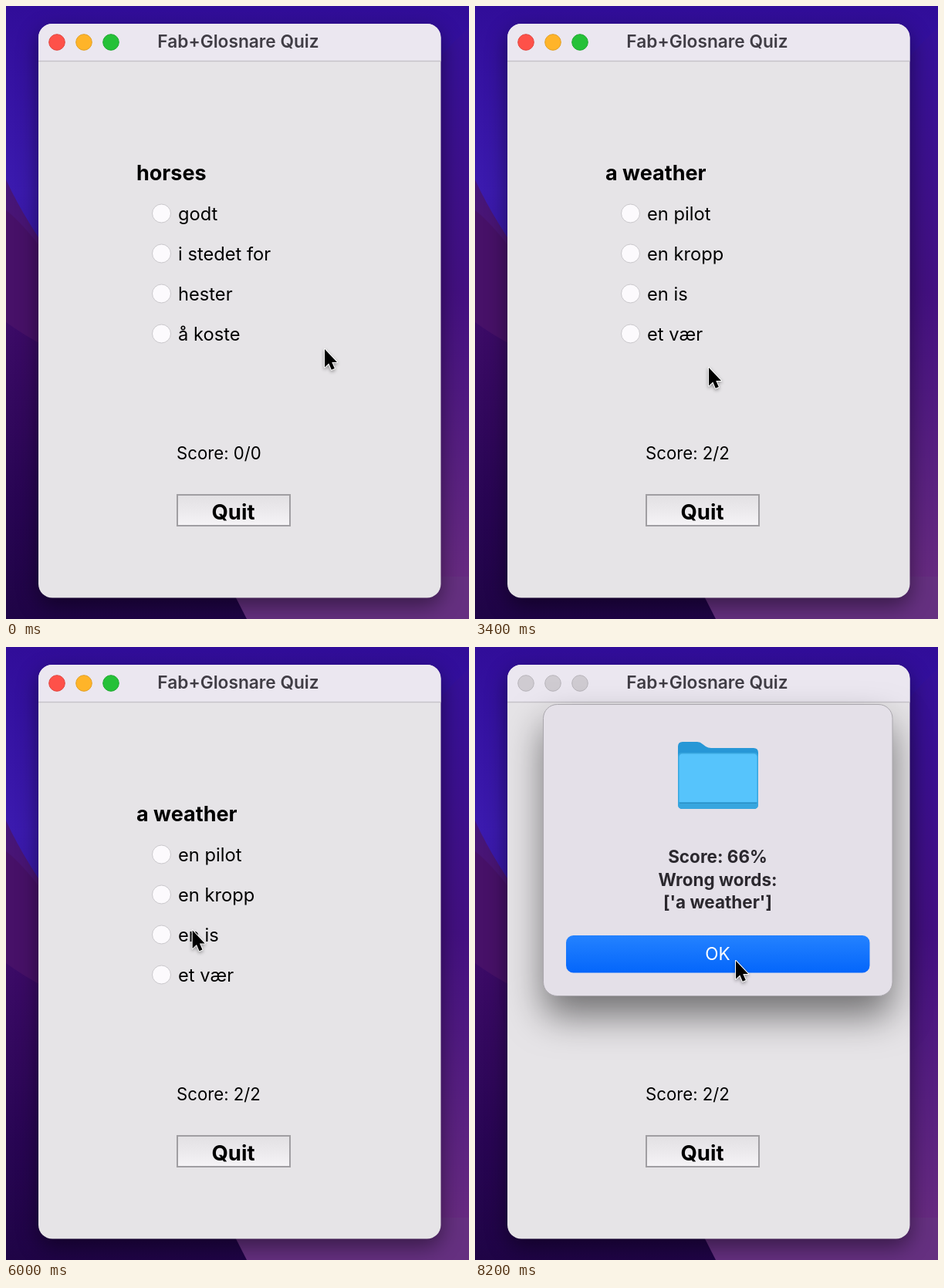
Write an HTML page that moves like this. It is 600 by 795 pixels and loops after 8.3 s.

```html
<!DOCTYPE html>
<html lang="en">
<head>
<meta charset="utf-8">
<title>Vocabulary quiz</title>
<style>
  html, body { margin: 0; width: 100%; height: 100%; overflow: hidden; background: #2c0c78; }
  svg { display: block; width: 600px; height: 795px; font-family: Inter, sans-serif; }
  .bold { font-weight: 700; }
  .middle { text-anchor: middle; }
  #window { filter: drop-shadow(0 10px 14px rgba(0, 0, 0, .45)); }
  #panel { filter: drop-shadow(0 26px 24px rgba(0, 0, 0, .5)); }
  #dialog { transform-origin: 314.5px 263.5px; }
  #cursor { filter: drop-shadow(0 2px 2px rgba(0, 0, 0, .35)); }
</style>
</head>
<body>
<svg viewBox="0 0 600 795">
  <defs>
    <linearGradient id="sky" x2="0" y2="1">
      <stop stop-color="#310d99"/>
      <stop offset=".3" stop-color="#3b1aae"/>
      <stop offset="1" stop-color="#2a0a70"/>
    </linearGradient>
    <linearGradient id="plum" x2="0" y2="1">
      <stop stop-color="#451579"/>
      <stop offset="1" stop-color="#551568"/>
    </linearGradient>
    <linearGradient id="night" x2="0" y2="1">
      <stop stop-color="#3c0b67"/>
      <stop offset=".6" stop-color="#280553"/>
      <stop offset="1" stop-color="#1f0446"/>
    </linearGradient>
    <linearGradient id="dusk" x2="0" y2="1">
      <stop stop-color="#35109a"/>
      <stop offset=".45" stop-color="#431080"/>
      <stop offset="1" stop-color="#6b2e80"/>
    </linearGradient>
    <linearGradient id="button" x2="0" y2="1">
      <stop stop-color="#e2e0e3"/>
      <stop offset="1" stop-color="#f5f3f6"/>
    </linearGradient>
    <linearGradient id="blue" x2="0" y2="1">
      <stop stop-color="#2482ff"/>
      <stop offset="1" stop-color="#0466fb"/>
    </linearGradient>
  </defs>

  <path fill="url(#sky)" d="M0 0H600V795H0Z"/>
  <path fill="url(#dusk)" d="M600 28Q575 50 550 82V795H600Z"/>
  <path fill="url(#plum)" d="M0 225Q18 265 50 312V450H0Z"/>
  <path fill="#471168" d="M0 265Q20 280 50 320V450H0Z"/>
  <path fill="url(#night)" d="M0 410Q22 426 50 441V740H320V795H0Z"/>
  <path fill="#653080" d="M284 740H600V795H312Z"/>

  <g id="window">
    <rect x="42" y="23" width="521.5" height="744.5" rx="18" fill="#e6e4e7"/>
    <path fill="#ebe7f0" d="M42 71V41a18 18 0 0 1 18-18H545.500a18 18 0 0 1 18 18V71Z"/>
  </g>
  <path stroke="#c6c3c9" stroke-width="1.5" d="M42 71.500H563.500"/>
  <g id="lights" stroke-width="1"></g>
  <text class="middle" x="301" y="54" font-size="22.700" font-weight="600" fill="#403d45">Fab+Glosnare Quiz</text>

  <text id="question" class="bold" x="169" y="226" font-size="27"></text>
  <g id="answers" font-size="23.700"></g>
  <text id="score" x="221" y="588" font-size="22.200"></text>
  <rect x="222" y="634" width="146" height="40" fill="url(#button)" stroke="#a09ea2" stroke-width="2"/>
  <text class="bold middle" x="294.500" y="666" font-size="27.500">Quit</text>

  <g id="dialog">
    <rect id="panel" x="88.500" y="74.500" width="452.500" height="378" rx="18" fill="#e4e0e8"/>
    <rect x="88.500" y="74.500" width="452.500" height="378" rx="18" fill="none" stroke="#aaa7ad"/>
    <path fill="#2797d6" d="M263 129q0-6 6-6H288q4 0 7 3l4 3q3 2 7 2H361q6 0 6 6V204q0 6-6 6H269q-6 0-6-6Z"/>
    <path fill="#37a6df" d="M263 142q0-5 5-5H362q5 0 5 5V204q0 6-6 6H269q-6 0-6-6Z"/>
    <path fill="#56c4fc" d="M264.500 143q0-4.500 4.500-4.500H361q4.500 0 4.500 4.500V201H264.500Z"/>
    <path stroke="#2c8fc4" d="M265 202.500H365"/>
    <g class="bold middle" font-size="22.500" fill="#2b282e">
      <text x="314.500" y="280">Score: 66%</text>
      <text x="314.500" y="310">Wrong words:</text>
      <text x="314.500" y="339">['a weather']</text>
    </g>
    <rect x="118" y="374" width="393.500" height="48.500" rx="9.500" fill="url(#blue)"/>
    <text class="middle" x="314.500" y="406" font-size="22.500" fill="#fff">OK</text>
  </g>

  <path id="cursor" stroke="#fff" stroke-width="2" stroke-linejoin="round" paint-order="stroke"
    d="M1 2V25.500L6.300 20.600 9.800 28.800 13.800 27.100 10.300 19H17Z"/>
</svg>
<script>
const LOOP = 8300, STEP = 100, DIALOG_AT = 6100, DIALOG_TIME = 200;

const rounds = [
  { at: 0, question: 'horses', answers: ['godt', 'i stedet for', 'hester', 'å koste'] },
  { at: 1300, question: 'nine', answers: ['ni', 'å mene', 'har forlatt', 'i løpet av'] },
  { at: 2400, question: 'a weather', answers: ['en pilot', 'en kropp', 'en is', 'et vær'] },
];

// Cursor stops: time, x, y
const stops = [
  [200, 412, 443], [900, 240, 376], [1400, 240, 376], [1900, 238, 283],
  [2500, 238, 283], [3200, 302, 467], [4100, 302, 467], [4800, 239, 362],
  [5700, 239, 362], [6100, 241, 366], [6600, 241, 366], [7300, 337, 405],
];

const $ = id => document.getElementById(id);
const clamp = v => Math.max(0, Math.min(1, v));
const smooth = p => p * p * (3 - 2 * p);

$('lights').innerHTML = [66, 101, 136]
  .map(x => `<circle cx="${x}" cy="47" r="10.3"/>`).join('');
$('answers').innerHTML = [269, 321, 373, 425].map(y =>
  `<circle cx="201.500" cy="${y}" r="12" fill="#fcfafd" stroke="#cac8cc"/>
   <text x="223" y="${y + 9}"></text>`).join('');
const lights = [...$('lights').children];
const labels = $('answers').querySelectorAll('text');

function cursorAt(t) {
  const next = stops.findIndex(s => s[0] > t);
  if (next === 0) return stops[0].slice(1);
  if (next < 0) return stops.at(-1).slice(1);
  const [t0, x0, y0] = stops[next - 1], [t1, x1, y1] = stops[next];
  const p = smooth((t - t0) / (t1 - t0));
  return [x0 + (x1 - x0) * p, y0 + (y1 - y0) * p];
}

function draw(t) {
  const index = rounds.findLastIndex(r => t >= r.at);
  const { question, answers } = rounds[index];
  $('question').textContent = question;
  labels.forEach((label, i) => label.textContent = answers[i]);
  $('score').textContent = `Score: ${index}/${index}`;

  const active = t < DIALOG_AT;
  lights.forEach((light, i) => {
    light.setAttribute('fill', active ? ['#fe5149', '#ffb429', '#25c138'][i] : '#cfcbd1');
    light.setAttribute('stroke', active ? ['#e2453f', '#e2a024', '#20a931'][i] : '#b8b5bb');
  });

  const shown = 1 - (1 - clamp((t - DIALOG_AT) / DIALOG_TIME)) ** 3;
  $('dialog').style.opacity = shown;
  $('dialog').style.transform = `scale(${1 + .13 * (1 - shown)})`;
  $('cursor').setAttribute('transform', `translate(${cursorAt(t)})`);
}

function tick() {
  draw(Math.floor(performance.now() % LOOP / STEP) * STEP);
  requestAnimationFrame(tick);
}
tick();
</script>
</body>
</html>
```
